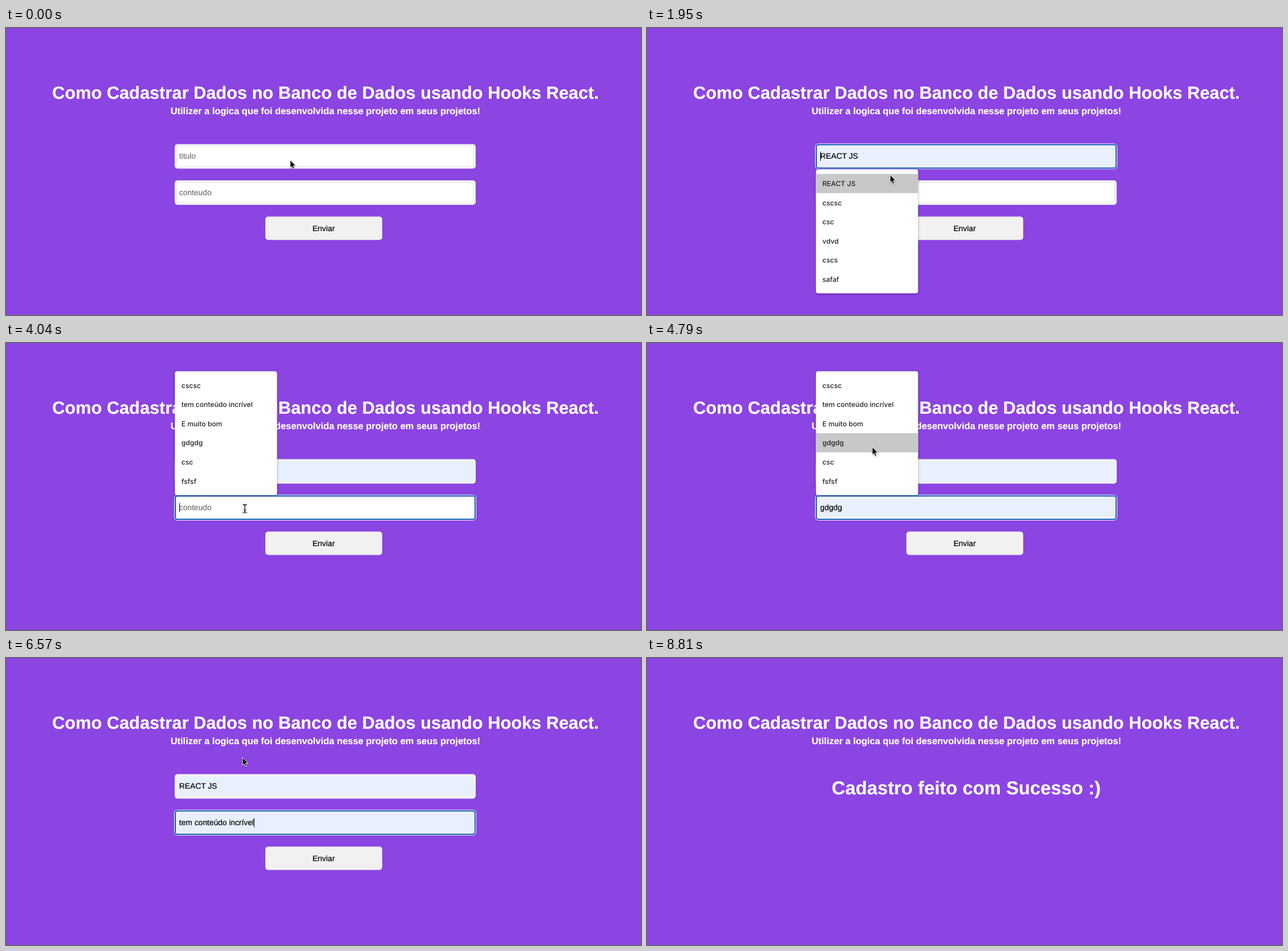
Animation of 1114x503 px, one loop 9410 ms. Source, as an HTML page:

```html
<!DOCTYPE html>
<html lang="pt">
<head>
<meta charset="utf-8">
<title>Cadastro</title>
<style>
  html, body { margin: 0; width: 100%; height: 100%; overflow: hidden; background: #8c44e2; }
  svg { display: block; font: 13.8px "Liberation Sans", Arial, sans-serif; text-rendering: geometricPrecision; }
  text { stroke-width: .2px; }
  .bold { font-weight: 700; fill: #fff; stroke: #fff; }
  .mid { text-anchor: middle; }
  .menu { font: 500 12.1px Inter, sans-serif; fill: #222; }
  .panel { fill: #fff; filter: drop-shadow(0 1px 2px #0005); }
  .cursor { filter: drop-shadow(0 1px 1px #0005); }
</style>
</head>
<body>
<svg width="1114" height="503" viewBox="0 0 1114 503">
  <text class="bold mid" x="560.6" y="124" font-size="30.77">Como Cadastrar Dados no Banco de Dados usando Hooks React.</text>
  <text class="bold mid" x="560.4" y="151" font-size="16.42">Utilizer a logica que foi desenvolvida nesse projeto em seus projetos!</text>
  <g id="scene"></g>
</svg>
<script>
// The screen refreshes in equal steps; all moments below are counted in them.
const LOOP = 9410, STEPS = 63, STEP = LOOP / STEPS;
const BLUR = 51, SENT = 52;
const ROW = 33.6, PAD = 7.8, TEXT_X = 303.8;

const form = [
  { y: 203.4, hint: 'titulo', value: 'REACT JS', open: 10, picked: 18, blur: 27,
    menuY: 248, items: ['REACT JS', 'cscsc', 'csc', 'vdvd', 'cscs', 'safaf'] },
  { y: 267, hint: 'conteudo', value: 'tem conteúdo incrível', open: 27, picked: 41, blur: BLUR,
    menuY: 49.5, items: ['cscsc', 'tem conteúdo incrível', 'E muito bom', 'gdgdg', 'csc', 'fsfsf'] }];

const start = { x: 499, y: 232 };
const moves = [
  { from: 0, to: 8, x: 480.5, y: 236 },
  { from: 11, to: 13, x: 427, y: 258 },
  { from: 13, to: 16, x: 418.3, y: 268.5 },
  { from: 19, to: 25, x: 419, y: 290 },
  { from: 28, to: 35, x: 380.5, y: 113.5 },
  { from: 42, to: 48, x: 514.5, y: 350.5 },
  { from: 53, to: 59, x: 1109, y: 505 }];

const scene = document.getElementById('scene');
const pen = document.createElement('canvas').getContext('2d');
pen.font = '13.8px "Liberation Sans", Arial, sans-serif';

const rect = (x, y, w, h, r, attrs) =>
  `<rect x="${x}" y="${y}" width="${w}" height="${h}" rx="${r}" ${attrs}/>`;
const text = (x, y, str, attrs) => `<text x="${x}" y="${y}" ${attrs}>${str}</text>`;
const paint = color => `fill="${color}" stroke="${color}"`;
const inside = (p, x, y, w, h) => p.x >= x && p.x < x + w && p.y >= y && p.y < y + h;
const ease = k => k * k * (3 - 2 * k);

function pointerAt(step) {
  let { x, y } = start;
  for (const m of moves) {
    const k = ease(Math.min(1, Math.max(0, (step - m.from) / (m.to - m.from))));
    x += (m.x - x) * k;
    y += (m.y - y) * k;
  }
  return { x, y };
}

function drawField(f, step, preview) {
  const picked = step >= f.picked;
  const shown = picked ? f.value : preview;
  let out = rect(296, f.y, 528, 43, 5, 'fill="#f1f1f1"') +
    rect(301, f.y + 4.7, 518, 33.6, 1, `fill="${shown ? '#e8f0fe' : '#fff'}"`) +
    text(TEXT_X, f.y + 26, shown || f.hint, paint(shown ? '#000' : '#757575'));
  if (step >= f.open && step < f.blur) {
    out += rect(295.5, f.y - .5, 529, 44, 5, 'fill="none" stroke="#fff"') +
      rect(297, f.y + 1, 526, 41, 3.5, 'fill="none" stroke="#1059b8" stroke-width="2"');
    const elapsed = (step - (picked ? f.picked : f.open)) * STEP;
    if (elapsed % 1000 < 500) {
      const x = picked ? TEXT_X + pen.measureText(f.value).width : 304;
      out += rect(x, f.y + 13.5, 1, 16, 0, 'fill="#000"');
    }
  }
  return out;
}

function drawMenu({ menuY, items }, hovered) {
  return rect(296.3, menuY, 179.2, 217, 4, 'class="panel"') + items.map((item, i) => {
    const top = menuY + PAD + i * ROW;
    return (i === hovered ? rect(296.3, top, 179.2, ROW, 0, 'fill="#c8c8c8"') : '') +
      text(307.7, top + 21.2, item, 'class="menu"');
  }).join('');
}

function drawPointer({ x, y }, beam) {
  const line = 'M-3.5-7.2Q0-7.2 0-4.5Q0-7.2 3.5-7.2M0-4.5V4.5M-3.5 7.2Q0 7.2 0 4.5Q0 7.2 3.5 7.2M-2 2.5H2';
  const shape = beam
    ? `<path d="${line}" fill="none" stroke="#fff" stroke-width="2.6"/><path d="${line}" fill="none" stroke="#000" stroke-width="1.2"/>`
    : '<path d="M-.5-.8V13.2L2.4 10.4 4.6 15.4 7.1 14.3 5 9.5H9.4Z" stroke="#fff"/>';
  return `<g class="cursor" transform="translate(${x} ${y})">${shape}</g>`;
}

function draw(step) {
  const mouse = pointerAt(step);
  const active = form.find(f => step >= f.open && step < f.picked);
  const overMenu = active && inside(mouse, 296, active.menuY, 180, 217);
  const hovered = overMenu ? Math.floor((mouse.y - active.menuY - PAD) / ROW) : -1;
  let overText = inside(mouse, 81, 96, 959, 36) || inside(mouse, 289, 137, 543, 18);
  let out = '';
  if (step < SENT) {
    overText ||= form.some(f => inside(mouse, 296, f.y, 528, 43));
    out += form.map(f => drawField(f, step, f === active && f.items[hovered])).join('');
    const hot = inside(mouse, 455, 330, 205, 41);
    out += rect(455, 330.5, 205, 41, 5, `fill="${hot ? '#e63030' : '#f1f1f1'}"`) +
      text(557.2, 355.5, 'Enviar', `class="mid${hot ? ' bold' : ''}" ${paint('#000')}`);
    if (active) out += drawMenu(active, hovered);
  } else {
    out += text(560, 239, 'Cadastro feito com Sucesso :)', 'class="bold mid" font-size="32.8"');
  }
  scene.innerHTML = out + drawPointer(mouse, step > 0 && overText && !overMenu);
}

let last = -1;
function frame(now) {
  // a few ms early, so that rounded clock values land on their own step
  const step = Math.floor((now % LOOP + 5) / STEP) % STEPS;
  if (step !== last) draw(last = step);
  requestAnimationFrame(frame);
}
draw(last = 0);
requestAnimationFrame(frame);
</script>
</body>
</html>
```
